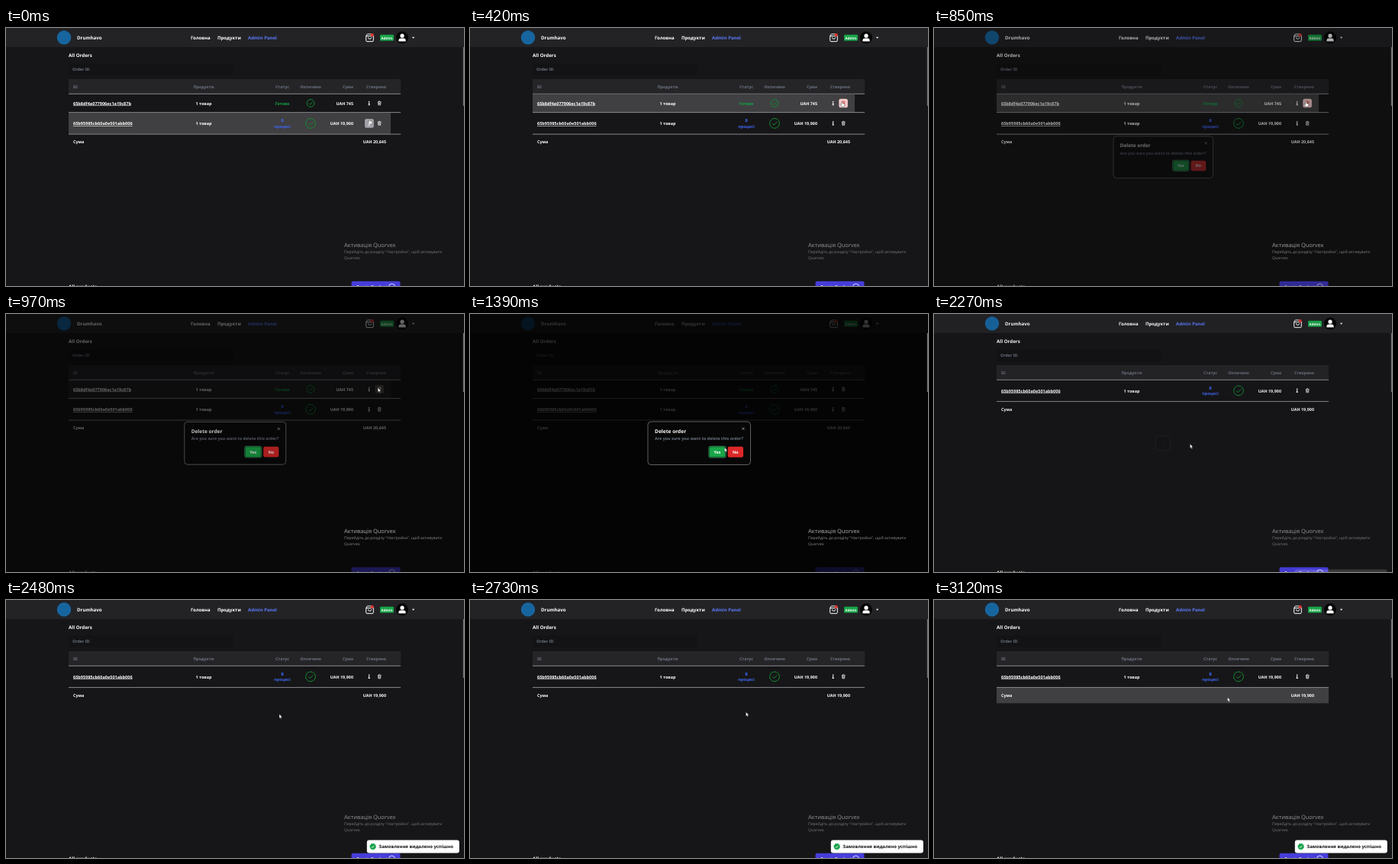
Write an HTML page that moves like this. It is 600 px wide and 338 px high and loops after 3.21 s.

```html
<!DOCTYPE html>
<html lang="uk">
<head>
<meta charset="utf-8">
<title>Orders</title>
<style>
html, body { margin: 0; width: 100%; height: 100%; overflow: hidden; background: #161618; }
svg { display: block; width: 100vw; height: 100vh; }
text { font: 700 5.4px "Noto Sans", "Open Sans", sans-serif; fill: #fff; text-rendering: geometricPrecision; }
.nav { font-size: 6px; }
.big { font-size: 6.2px; }
.mute { fill: #6d7280; font-size: 5.3px; }
.id { font-size: 5.55px; text-decoration: underline; }
.mid { text-anchor: middle; }
.end { text-anchor: end; }
.link { fill: #5b78f5; }
.done { fill: #12a546; }
.busy { fill: #3f66f2; }
.note { font-weight: 400; font-size: 5.1px; fill: #fff; }
.line { stroke: #a6a6aa; stroke-width: .8; }
.ok { fill: none; stroke: #138a35; }
</style>
</head>
<body>
<svg viewBox="0 0 600 338" preserveAspectRatio="none">
  <defs>
    <g id="info" fill="#fff"><circle cy="-2" r=".8"/><path d="M-1-.7H.6V1.9H1.2V2.7H-1.2V1.9H-.6V.1H-1z"/></g>
    <g id="trash" fill="none" stroke-width=".7"><path d="M-2.3-1.7H2.3M-.8-1.8V-2.5H.8V-1.8M-1.7-1.5-1.4 2.4H1.4L1.7-1.5M-.5-.5V1.4M.5-.5V1.4"/></g>
    <path id="close" d="M-1.6-1.6 1.6 1.6M1.6-1.6-1.6 1.6" stroke="#b4b4ba" stroke-width=".7"/>
  </defs>

  <rect width="600" height="338" fill="#161618"/>
  <rect width="600" height="25" fill="#232326"/>
  <circle cx="76" cy="12.5" r="9.2" fill="#17659f"/>
  <text class="big" x="93" y="14.8">Drumhavo</text>
  <text class="nav" x="242" y="14.8">Головна</text>
  <text class="nav" x="277" y="14.8">Продукти</text>
  <text class="nav link" x="317" y="14.8">Admin Panel</text>
  <g fill="none" stroke="#fff" stroke-width="1">
    <path d="M473.3 8H479.7L481.3 10.4V16.3Q481.3 17.7 479.9 17.7H473.1Q471.7 17.7 471.7 16.3V10.4zM471.7 10.6H481.3M474.4 12.3Q474.6 14.4 476.5 14.4T478.6 12.3"/>
  </g>
  <circle cx="479.7" cy="9.1" r="2.1" fill="#e2342f"/>
  <rect x="490" y="8.8" width="18" height="8" rx="1.2" fill="#18a548"/>
  <text class="mid" x="499" y="14.5" style="font-size:4.6px">Admin</text>
  <circle cx="519" cy="12.6" r="8" fill="#050506"/>
  <circle cx="519" cy="10.2" r="2.6" fill="#fff"/>
  <path d="M514.3 17.6V16.5Q514.3 13.6 517.2 13.6H520.8Q523.7 13.6 523.7 16.5V17.6z" fill="#fff"/>
  <path d="M531.9 11.8H535.3L533.6 13.8z" fill="#fff"/>

  <text class="big" x="82" y="38">All Orders</text>
  <rect x="82" y="46.5" width="216" height="15.5" rx="2" fill="#131315"/>
  <text class="mute" x="87" y="56">Order ID</text>

  <rect x="82" y="67" width="435" height="19" fill="#252528"/>
  <g id="heads"></g>
  <path class="line" d="M82 86.3H517"/>

  <g id="row1">
    <rect id="hov1" x="82" y="86.7" width="422" height="23.6" fill="#404042"/>
    <text class="id" x="88" y="100.5">65b8df4a077906ec1a19c87b</text>
    <text class="mid" x="259" y="100.5">1 товар</text>
    <text class="mid done" x="362" y="100.5">Готово</text>
    <circle class="ok" cx="399" cy="98.5" r="4.9"/>
    <path class="ok" d="M396.7 98.6 398.4 100.2 401.5 96.9"/>
    <text class="end" x="455" y="100.5">UAH 745</text>
    <use href="#info" x="475.7" y="98.5"/>
    <rect id="btn2" x="483.3" y="92.7" width="11.6" height="11.6" rx="2.6" fill="#f3c9c9"/>
    <use id="bin" href="#trash" x="489.2" y="98.5"/>
    <path class="line" d="M82 110.6H517"/>
  </g>

  <g id="row2">
    <rect id="hov2" x="82" y="111" width="422" height="27.8" fill="#404042"/>
    <text class="id" x="88" y="127">65b95985cb60a0e501abb006</text>
    <text class="mid" x="259" y="127">1 товар</text>
    <text class="mid busy" x="362" y="123.2">В</text>
    <text class="mid busy" x="362" y="130.6">процесі</text>
    <circle class="ok" cx="399" cy="124.9" r="6.4"/>
    <path class="ok" d="M396 125 398.2 127.1 402.3 122.8"/>
    <text class="end" x="455" y="127">UAH 19,900</text>
    <rect id="btn1" x="470" y="119" width="11.8" height="11.8" rx="2.6" fill="#a2a2ac"/>
    <use href="#info" x="475.7" y="124.9"/>
    <use href="#trash" x="489.2" y="124.9" stroke="#fff"/>
    <rect id="hov3" x="82" y="139.3" width="435" height="20.5" fill="#404042"/>
    <path class="line" d="M82 139.1H517"/>
    <text x="88" y="151.4">Сума</text>
    <text id="sum" class="end" x="498" y="151.4"></text>
  </g>

  <text class="big" x="82" y="341">All products</text>
  <rect x="452.5" y="331.8" width="64" height="16" rx="2" fill="#463ddb"/>
  <text x="459" y="341.3">Create Product</text>
  <circle cx="505.5" cy="339" r="4" fill="none" stroke="#fff" stroke-width=".8"/>

  <rect id="shade" width="600" height="338"/>
  <path d="M599.4 25V102" stroke="#77777a" stroke-width="1.2"/>

  <g id="full">
    <rect x="233" y="141" width="134.5" height="56.5" rx="4" fill="#070708" stroke="#6a6a70" stroke-width=".9"/>
    <text x="242" y="156" style="font-size:6.6px">Delete order</text>
    <text class="mute" x="242" y="165.4" style="font-size:5.4px">Are you sure you want to delete this order?</text>
    <use href="#close" x="358" y="150.2"/>
    <rect x="312.9" y="173.3" width="22.2" height="14.8" rx="2" fill="#0b3a1c" stroke="#48b56f" stroke-width=".7"/>
    <rect x="314" y="174.3" width="20" height="12.8" rx="1.5" fill="#18a548"/>
    <text class="mid" x="324" y="182.8">Yes</text>
    <rect x="337.7" y="173.8" width="20.3" height="14" rx="2" fill="#dd2727"/>
    <text class="mid" x="347.8" y="182.8">No</text>
  </g>
  <g id="empty">
    <rect x="290.5" y="159.6" width="19" height="19.2" rx="3" fill="#0c0c0d" stroke="#a0a0a6" stroke-width=".9"/>
    <use href="#close" x="300" y="169.2"/>
  </g>

  <g id="toast">
    <rect x="472.8" y="314.5" width="121" height="17" rx="3" fill="#fff"/>
    <circle cx="480.6" cy="323" r="3.7" fill="#16a34a"/>
    <circle cx="480.6" cy="323" r="3.7" fill="none" stroke="#16a34a" stroke-width="1" stroke-dasharray="1.9 1"/>
    <path d="M478.8 323.1 480.1 324.4 482.5 321.8" fill="none" stroke="#fff" stroke-width=".9"/>
    <text x="488.3" y="325.2" style="font-size:5.95px;fill:#141416">Замовлення видалено успішно</text>
  </g>

  <g id="notice">
    <text class="note" x="443" y="287" style="font-size:7.4px">Активація Quorvex</text>
    <g opacity=".8">
      <text class="note" x="443" y="295.2">Перейдіть до розділу "Настройки", щоб активувати</text>
      <text class="note" x="443" y="302.8">Quorvex.</text>
    </g>
  </g>

  <path id="hand" d="M-.7.4Q0-.5.7.4V2.3L2.9 2.9Q3.5 3.2 3.3 4L2.8 6.4H-.9L-2.6 4Q-2.4 3-.7 4z" fill="#fff" stroke="#222" stroke-width=".4"/>
  <path id="arrow" d="M0 0V5.5L1.3 4.4 2.2 6.3 3.1 5.9 2.2 4H3.9z" fill="#fff" stroke="#111" stroke-width=".35"/>
</svg>
<script>
const LOOP = 3210, GONE = 2120;
const $ = id => document.getElementById(id);
const set = (id, attrs) => { for (const k in attrs) $(id).setAttribute(k, attrs[k]); };
const alpha = (id, v) => $(id).setAttribute("opacity", v.toFixed(3));
const ramp = (t, a, b) => Math.min(1, Math.max(0, (t - a) / (b - a)));
const smooth = p => p * p * (3 - 2 * p);

const heads = [["ID", 88], ["Продукти", 259], ["Статус", 362], ["Оплачено", 399], ["Сума", 448], ["Створено", 485]];
$("heads").innerHTML = heads.map(([s, x], i) =>
  `<text class="mute ${i ? "mid" : ""}" x="${x}" y="78.5">${s}</text>`).join("");

// pointer tip: time, x, y
const path = [
  [30, 476.5, 119.5], [350, 487.5, 96.5], [960, 487.5, 96.5], [1390, 333.4, 175],
  [1700, 325.5, 179.5], [2150, 325.5, 179.5], [2480, 358, 149.5], [2670, 360, 148], [3080, 384.5, 127.5]
];
function pointer(t) {
  let i = 0;
  while (i < path.length - 2 && t > path[i + 1][0]) i++;
  const [a, x, y] = path[i], [b, u, v] = path[i + 1], p = smooth(ramp(t, a, b));
  return [x + (u - x) * p, y + (v - y) * p];
}

function draw(t) {
  const gone = t >= GONE;
  const open = gone ? .55 * (1 - ramp(t, GONE, 2290)) : ramp(t, 720, 1050);
  const [x, y] = pointer(t);

  $("row1").style.display = gone ? "none" : "";
  set("row2", { transform: `translate(0 ${gone ? -24.5 : 0})` });
  $("sum").textContent = gone ? "UAH 19,900" : "UAH 20,645";

  const leave = 1 - ramp(t, 880, 1000);
  alpha("hov1", ramp(t, 170, 240) * leave);
  alpha("hov2", 1 - ramp(t, 170, 240));
  alpha("hov3", gone && y < 135 ? 1 : 0);
  alpha("btn1", 1 - ramp(t, 130, 200));
  alpha("btn2", ramp(t, 200, 270) * leave);
  set("bin", { stroke: t > 220 && t < 940 ? "#dc3a3a" : "#fff" });

  alpha("shade", .8 * open);
  const k = .95 + .05 * open;
  const zoom = `translate(300 169.2) scale(${k}) translate(-300 -169.2)`;
  set("full", { transform: zoom });
  alpha("full", gone ? 0 : open);
  alpha("empty", gone ? open * 1.3 : 0);

  const rise = 1 - (1 - ramp(t, 2260, 2460)) ** 3;
  set("toast", { transform: `translate(0 ${(24 * (1 - rise)).toFixed(2)})` });
  alpha("toast", gone ? rise : 0);
  alpha("notice", .5 + .15 * open);

  const hand = t < 940;
  set("hand", { transform: `translate(${x} ${y})` });
  set("arrow", { transform: `translate(${x} ${y})` });
  alpha("hand", hand ? 1 : 0);
  alpha("arrow", hand ? 0 : 1);
}

function tick() {
  draw(performance.now() % LOOP);
  requestAnimationFrame(tick);
}
tick();
</script>
</body>
</html>
```
